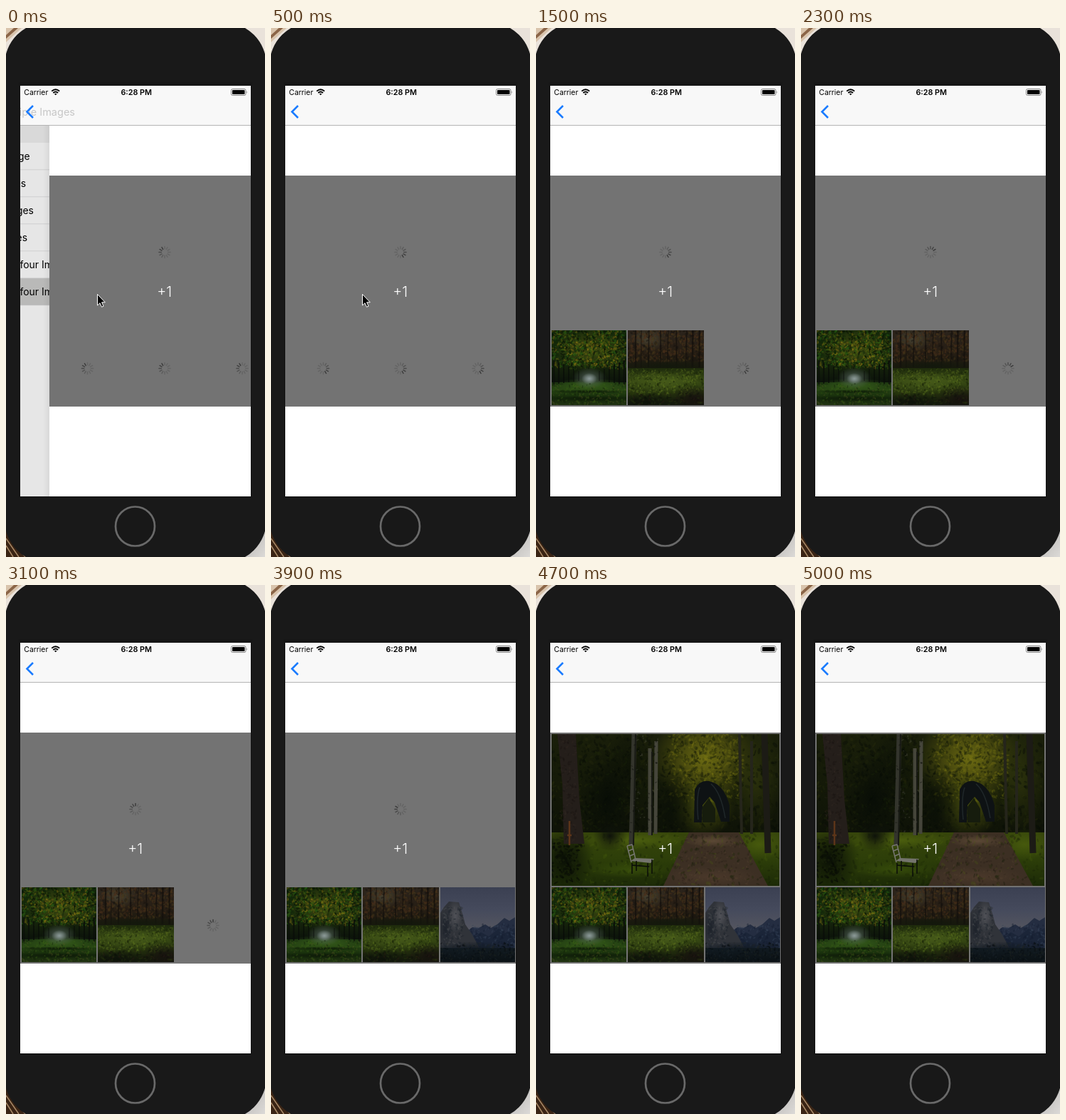
An HTML page with a canvas that plays this animation: 364x742 px, repeating every 5100 ms.

```html
<!DOCTYPE html>
<html lang="en">
<head>
<meta charset="utf-8">
<title>Image grid loading</title>
<style>
  html, body { margin: 0; width: 100%; height: 100%; overflow: hidden; background: #191919; }
  svg, canvas { position: absolute; display: block; }
  svg { left: 0; top: 0; width: 364px; height: 742px; }
  text { font-family: Inter, "Liberation Sans", sans-serif; }
</style>
</head>
<body>
<svg id="base" viewBox="0 0 364 742">
  <defs>
    <clipPath id="screen"><rect x="20" y="81" width="324" height="576"/></clipPath>
    <linearGradient id="edge"><stop offset="0" stop-opacity="0"/><stop offset="1" stop-opacity=".06"/></linearGradient>
    <linearGradient id="marble" x2="1" y2="1"><stop offset="0" stop-color="#a5a3a1"/><stop offset="1" stop-color="#dcdad7"/></linearGradient>
  </defs>

  <!-- table and phone body -->
  <rect width="364" height="742" fill="#e9e2da"/>
  <path d="M0 0H22L0 20Z" fill="#d9c4ac"/>
  <path d="M0 10L11 0H17L0 15Z" fill="#8b6547"/>
  <path d="M0 690H44V742H0Z" fill="#3a2414"/>
  <path d="M0 716L18 742M0 726L10 742M3 711L27 742" stroke="#a98a68" stroke-width="1.500"/>
  <rect x="324" y="690" width="40" height="52" fill="url(#marble)"/>
  <rect x="-2" y="-8" width="368" height="758" rx="60" fill="#191919"/>
  <rect x="18" y="76" width="328" height="583" fill="#161616"/>
  <circle cx="181.500" cy="699" r="27.500" fill="#181818" stroke="#696969" stroke-width="2.700"/>

  <g clip-path="url(#screen)">
    <rect x="20" y="81" width="324" height="576" fill="#fff"/>
    <g id="list">
      <rect x="-65" y="137" width="324" height="520" fill="#e6e6e6"/>
      <rect x="-65" y="137" width="324" height="24" fill="#d9d9d9"/>
      <rect x="-65" y="351" width="324" height="38" fill="#b9b9b8"/>
      <g id="rows" font-size="13.900"></g>
    </g>
    <g id="page">
      <rect x="11" y="137" width="9" height="520" fill="url(#edge)"/>
      <rect x="20" y="137" width="324" height="520" fill="#fff"/>
      <rect x="20" y="207" width="324" height="324" fill="#737373"/>
      <g id="spinners" stroke="#1c1c1c" stroke-width="1.400" stroke-linecap="round"></g>
    </g>

    <!-- status and navigation bar -->
    <rect x="20" y="81" width="324" height="55" fill="#f8f8f8"/>
    <rect x="20" y="136" width="324" height="1" fill="#b4b4b4"/>
    <text id="title" x="97" y="122.500" font-size="14.500" text-anchor="end">Multiple Images</text>
    <path d="M38 109L29.500 117.500L38 126" fill="none" stroke="#1a7bff" stroke-width="2.600"/>
    <text x="25.300" y="94" font-size="10.400">Carrier</text>
    <text x="183.200" y="94" font-size="10.800" font-weight="600" text-anchor="middle">6:28 PM</text>
    <g fill="none" stroke="#000" stroke-width="1.900">
      <path d="M64.200 88.600Q69.700 83.800 75.200 88.600M66.300 91Q69.700 88.100 73.100 91"/>
      <path d="M69.700 94.300L67.900 92.400Q69.700 91 71.500 92.400Z" fill="#000" stroke="none"/>
    </g>
    <rect x="316.500" y="85.500" width="20.500" height="9" rx="2" fill="#f8f8f8" stroke="#858585"/>
    <rect x="318" y="87" width="17.500" height="6" rx=".8"/>
    <path d="M338.200 88.500Q340 90 338.200 91.500Z" fill="#858585"/>
  </g>
</svg>

<svg id="top" viewBox="0 0 364 742">
  <text id="more" x="181.700" y="376.700" font-size="20" font-weight="300" text-anchor="middle" fill="#fff">+1</text>
  <path id="cursor" d="M128.500 373.500V389L132 385.800L134.500 391.300L137 390.200L134.600 384.800H139.300Z" fill="#000" stroke="#fff" stroke-width="1"/>
</svg>

<script>
const LOOP = 5100, STEP = 100;
const $ = id => document.getElementById(id);

function add(parent, name, attrs, text) {
  const el = document.createElementNS('http://www.w3.org/2000/svg', name);
  for (const key in attrs) el.setAttribute(key, attrs[key]);
  if (text) el.textContent = text;
  parent.append(el);
  return el;
}

['Single Image', 'Two Images', 'Three Images', 'Four Images', 'More than four Images', 'More than four Images']
  .forEach((label, i) => {
    const y = 161 + i * 38;
    add($('rows'), 'text', { x: -51, y: y + 23.5 }, label);
    add($('rows'), 'rect', { x: -51, y: y + 37.5, width: 310, height: .7, fill: '#c6c6c8' });
  });

function spinner(x, y, until) {
  const g = add($('spinners'), 'g', { transform: `translate(${x} ${y})` });
  const ticks = Array.from({ length: 12 }, (_, i) =>
    add(g, 'line', { y1: -4.7, y2: -8.1, transform: `rotate(${i * 30})` }));
  return { g, ticks, until };
}

// Seeded random numbers for the foliage
let seed = 7;
function rnd() {
  seed = (seed * 1664525 + 1013904223) >>> 0;
  return seed / 4294967296;
}

function photo(x, y, w, h, from, draw) {
  const el = document.createElement('canvas');
  el.width = w;
  el.height = h;
  el.style.left = x + 'px';
  el.style.top = y + 'px';
  $('top').before(el);
  const c = el.getContext('2d');
  const pen = {
    fill(color, d) { c.fillStyle = color; c.fill(new Path2D(d)); },
    line(color, width, d) { c.strokeStyle = color; c.lineWidth = width; c.stroke(new Path2D(d)); },
    fade(y0, y1, ...colors) {
      const g = c.createLinearGradient(0, y0, 0, y1);
      colors.forEach((k, i) => g.addColorStop(i / (colors.length - 1), k));
      c.fillStyle = g;
      c.fillRect(0, y0, w, y1 - y0);
    },
    // Soft ellipse
    glow(gx, gy, rx, ry, color) {
      c.save();
      c.translate(gx, gy);
      c.scale(rx, ry);
      const g = c.createRadialGradient(0, 0, 0, 0, 0, 1);
      g.addColorStop(0, color);
      g.addColorStop(1, color.slice(0, 7) + '00');
      c.fillStyle = g;
      c.fillRect(-1, -1, 2, 2);
      c.restore();
    },
    dabs(n, dx, dy, dw, dh, size, ...colors) {
      for (let i = 0; i < n; i++) {
        c.fillStyle = colors[Math.floor(rnd() * colors.length)];
        c.beginPath();
        c.ellipse(dx + rnd() * dw, dy + rnd() * dh, size * (.5 + rnd()), size * (.3 + rnd() * .5), rnd() * 3, 0, 7);
        c.fill();
      }
    }
  };
  draw(pen);
  return { el, from };
}

function park({ fill, line, fade, glow, dabs }) {
  fade(0, 142, '#1a1f0a', '#141908', '#0e1207');
  glow(215, 35, 75, 65, '#6d6b12');
  glow(212, 100, 48, 45, '#4a500e');
  glow(285, 60, 40, 75, '#2b310c');
  dabs(900, 0, 0, 320, 138, 3, '#20270a60', '#2c310c50', '#0a0e0670', '#12180860');
  dabs(450, 165, 0, 105, 95, 2.2, '#77751450', '#5a5c1060', '#8c821840', '#1c230a70');
  glow(80, 92, 42, 75, '#080d06');
  glow(168, 105, 38, 58, '#090e06d0');
  glow(108, 45, 32, 70, '#0b1006b0');
  dabs(260, 40, 20, 150, 115, 2.2, '#1b260b50', '#060a0560');

  fade(138, 213, '#36450b', '#2d3e09', '#1c2a07');
  glow(115, 149, 80, 13, '#53670fc0');
  glow(292, 155, 38, 22, '#4d610ec0');
  glow(110, 190, 60, 12, '#3d550bb0');
  fill('#3c2f23', 'M193 138H263L304 213H157Z');
  glow(226, 150, 40, 9, '#5c4935');
  glow(225, 200, 66, 14, '#4a382a');
  dabs(320, 0, 140, 320, 73, 2.5, '#4d620e38', '#111b0650', '#1c2a0750');
  dabs(200, 178, 142, 100, 69, 1.7, '#5c493540', '#251c1550');
  glow(18, 175, 42, 45, '#080d05');
  dabs(130, 0, 148, 42, 62, 2.5, '#18220a90', '#070b0590');
  glow(82, 143, 24, 21, '#0e120a');

  fill('#0e1214', 'M200 124L201 78Q208 64 221 66Q242 70 250 100V123H238L229 96L222 88L212 100L211 124Z');
  fill('#161c0d', 'M212 124V102L221 90L230 105V124Z');
  line('#20282a', 1.5, 'M208 75Q203 90 206 120M224 70Q238 82 244 118');

  fill('#241e1a', 'M8 0H34L39 92L46 154H17L15 70Z');
  dabs(160, 12, 0, 23, 150, 2, '#342b2450', '#17131060');
  line('#33342c', 7, 'M116 0L112 157');
  line('#45453a', 5, 'M138 20V142M147 10L146 140');
  line('#171913', 2, 'M118 0L115 156M141 25V142');
  dabs(80, 108, 0, 42, 140, 1.5, '#595a4b50', '#12140f90');
  line('#1c1b15', 9, 'M299 0L304 167');
  line('#25251b', 4, 'M264 0L267 140M281 10V140');
  line('#5c3519', 2.5, 'M25 122V156M22 142H28');

  line('#777771', 1.5, 'M106 157L112 180M113 155L118 176M106 157L113 155M108 164L115 161M110 171L117 168');
  fill('#74746d', 'M111 178L117 174L144 175L139 181Z');
  line('#0a0c09', 1.5, 'M113 181V196M119 178V192M135 181V200M141 176V196M113 184L137 186');
}

function avenue({ fill, line, fade, glow, dabs }) {
  fade(0, 73, '#12250a', '#1b2d0c', '#0b120a');
  glow(55, 25, 50, 32, '#3e470f');
  dabs(800, 0, 0, 105, 54, 2, '#23591290', '#12290a90', '#3c540f80', '#71631270', '#07100690');
  dabs(160, 18, 14, 76, 36, 1.5, '#8a761490', '#4c691470');
  fade(73, 105, '#1c3510', '#284713', '#152a0b', '#203211');
  glow(53, 77, 50, 10, '#365c1b');
  glow(53, 67, 24, 15, '#4e5d53');
  glow(53, 68, 11, 8, '#8c9a98');
  for (let i = 0; i < 6; i++) {
    const d = 3 + i * 7;
    line('#0a0d0ab0', 2.4 - i * .25, `M${d} ${42 + i * 3}V${76 - i}M${105 - d} ${42 + i * 3}V${76 - i}`);
  }
  glow(53, 86, 60, 3, '#0c1a07');
  glow(53, 96, 70, 4, '#0e1a08');
  dabs(220, 0, 75, 105, 30, 1.6, '#3d621560', '#12200970', '#55552750');
}

function clearing({ line, fade, glow, dabs }) {
  fade(0, 60, '#2b231b', '#271e14', '#14160b');
  glow(28, 12, 28, 18, '#45402f');
  dabs(520, 0, 0, 107, 44, 2.2, '#4b301980', '#382a1a70', '#17130f80', '#4c3c1a60');
  for (let i = 0; i < 9; i++) {
    const x = 4 + i * 12 + rnd() * 8;
    line('#110f0cb0', 1 + rnd() * 2, `M${x} 0L${x + rnd() * 4 - 2} 52`);
  }
  glow(56, 50, 65, 9, '#13180c');
  fade(53, 105, '#1d290c', '#394b14', '#26340e', '#10150a');
  glow(50, 72, 50, 16, '#455919');
  dabs(420, 0, 54, 107, 36, 1.7, '#53691b70', '#2a380e80', '#161f0880', '#6a7b2250');
  glow(94, 96, 36, 19, '#16110e');
  glow(25, 99, 45, 11, '#0e130a');
  dabs(100, 0, 88, 107, 17, 2, '#0c0f0970', '#241c1370', '#29360f60');
}

function valley({ fill, line, fade, glow, dabs }) {
  fade(0, 62, '#3b4052', '#454a5c', '#55565f');
  fill('#242d41', 'M32 66L45 56L54 57L63 52L71 57L80 52L90 43L97 47L105 42V100H32Z');
  fill('#1b2538', 'M42 75L57 63L68 69L82 58L91 64L105 57V100H42Z');
  dabs(120, 42, 52, 63, 34, 2, '#39445960', '#151e3070');
  fill('#303339', 'M0 36L5 28L12 20L26 21L31 37L35 52L44 65L55 85H0Z');
  glow(21, 40, 11, 24, '#505157');
  glow(7, 57, 9, 27, '#1e232b');
  dabs(150, 3, 27, 29, 54, 1.7, '#51525660', '#20252d80');
  glow(48, 86, 70, 10, '#131b25');
  fade(85, 105, '#111a21', '#0e151a', '#0a1014');
  dabs(180, 0, 78, 105, 27, 1.8, '#090e1190', '#1a232870', '#22262050');
}

const photos = [
  photo(22, 424, 105, 105, 900, avenue),
  photo(129, 424, 107, 105, 1200, clearing),
  photo(238, 424, 105, 105, 3700, valley),
  photo(22, 209, 320, 213, 4700, park)
];
const spinners = [
  spinner(73.5, 477.5, 900),
  spinner(182, 477.5, 1200),
  spinner(291, 477.5, 3700),
  spinner(182, 314.5, 4700)
];

const show = (el, on) => { el.style.visibility = on ? 'visible' : 'hidden'; };

function render(now) {
  const t = Math.floor((now % LOOP) / STEP + .01) * STEP;

  // Tail of the push transition; the list moves at 30% of the page's speed
  const left = t < 500 ? 41 * Math.exp(-t / 95) : 0;
  $('page').setAttribute('transform', `translate(${left} 0)`);
  $('more').setAttribute('transform', `translate(${left} 0)`);
  $('list').setAttribute('transform', `translate(${(left - 41) * .3} 0)`);
  $('title').setAttribute('transform', `translate(${(left - 41) * .5} 0)`);
  $('title').setAttribute('fill-opacity', left / 41 * .2);
  show($('cursor'), t < 1000);

  const head = Math.floor(t * .012 + 11.2);
  for (const s of spinners) {
    show(s.g, t < s.until);
    s.ticks.forEach((tick, i) => {
      const age = (head - i + 12) % 12;
      tick.setAttribute('stroke-opacity', Math.max(.17, .68 - age * .1));
    });
  }
  for (const p of photos) show(p.el, t >= p.from);
}

function frame() {
  render(performance.now());
  requestAnimationFrame(frame);
}
frame();
</script>
</body>
</html>
```
